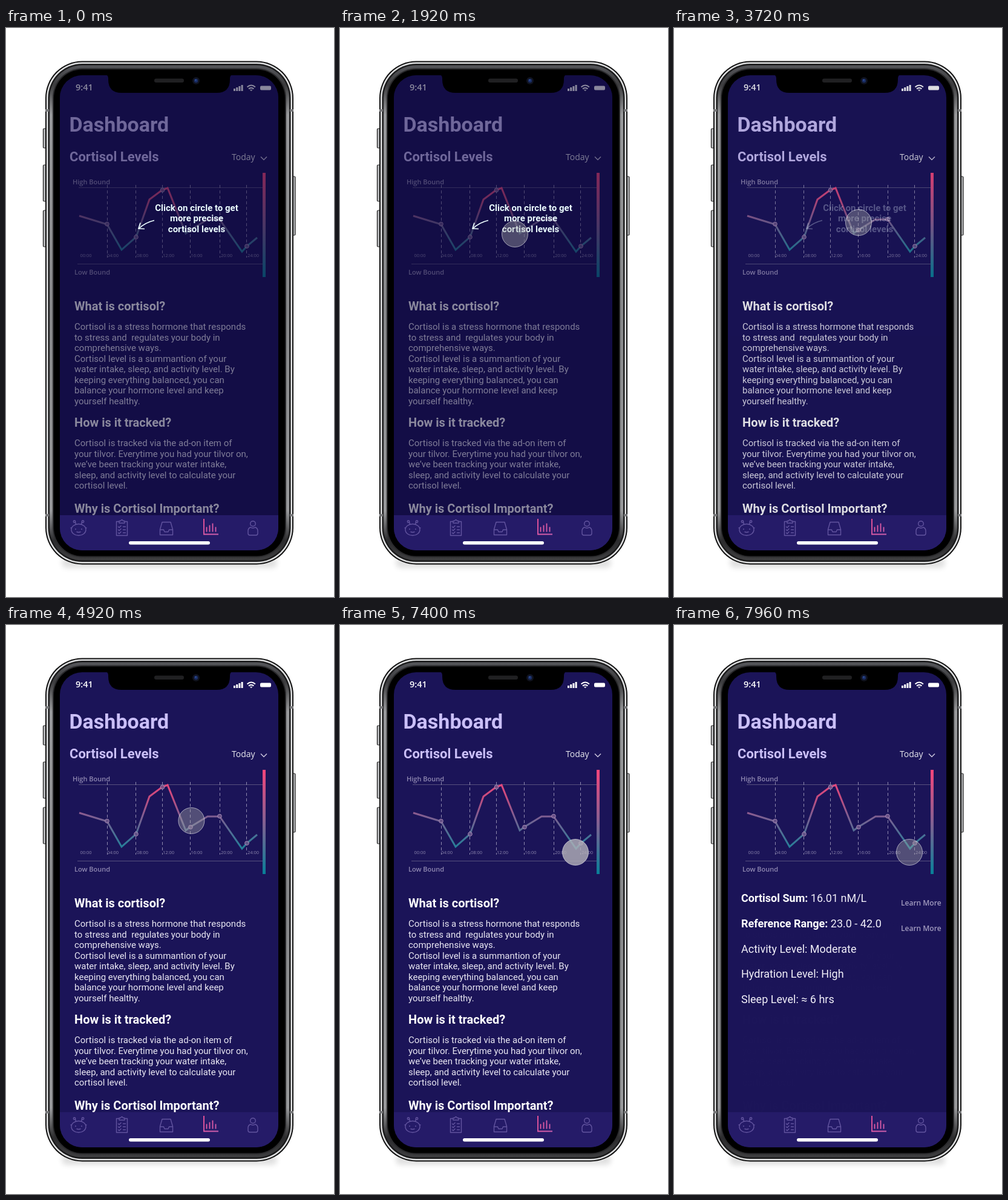
Animation of 542x939 px, one loop 8000 ms. Source, as an HTML page:

```html
<!DOCTYPE html>
<html lang="en">
<head>
<meta charset="utf-8">
<title>Cortisol dashboard</title>
<style>
html, body { margin: 0; width: 100%; height: 100%; overflow: hidden; background: #fff; }
svg { display: block; width: 542px; height: 939px; }
text { font-family: Roboto, sans-serif; fill: #fff; white-space: pre; }
.sans { font-family: "Open Sans", sans-serif; }
.title { font-weight: 700; fill: #cabff8; }
.heading { font-size: 20px; font-weight: 700; }
.body { font-size: 15px; fill: #e9e7f3; }
.row { font-size: 18px; fill: #f3f1fa; }
.row tspan { font-weight: 700; fill: #fff; }
.bound { font-size: 11px; font-weight: 600; fill: #9089b2; }
.more { font-size: 12px; font-weight: 600; fill: #a39dc0; }
.tick { font-size: 7.5px; fill: #8c86ad; }
.hint { font-size: 15px; font-weight: 700; fill: #ebfcff; text-anchor: middle; }
.icon { fill: none; stroke: #62549f; stroke-width: 1.4; stroke-linecap: round; stroke-linejoin: round; }
</style>
</head>
<body>
<svg viewBox="0 0 542 939">
  <defs>
    <linearGradient id="level" gradientUnits="userSpaceOnUse" x1="0" y1="262" x2="0" y2="368">
      <stop offset="0" stop-color="#e4477d"/>
      <stop offset=".22" stop-color="#c44c7e"/>
      <stop offset=".5" stop-color="#815e91"/>
      <stop offset="1" stop-color="#237f98"/>
    </linearGradient>
    <linearGradient id="scale" x2="0" y2="1">
      <stop offset="0" stop-color="#f3457b"/>
      <stop offset=".5" stop-color="#846091"/>
      <stop offset="1" stop-color="#087f98"/>
    </linearGradient>
    <linearGradient id="steel" x2="0" y2="1">
      <stop offset="0" stop-color="#55565a"/>
      <stop offset=".04" stop-color="#3c3c3e"/>
      <stop offset=".1" stop-color="#97989a"/>
      <stop offset=".5" stop-color="#858688"/>
      <stop offset=".9" stop-color="#97989a"/>
      <stop offset=".96" stop-color="#2c2c2e"/>
      <stop offset="1" stop-color="#3e3e40"/>
    </linearGradient>
    <linearGradient id="active" x2="1" y2="1">
      <stop offset="0" stop-color="#f7559b"/>
      <stop offset="1" stop-color="#c85fae"/>
    </linearGradient>
    <filter id="blur" x="-10%" y="-100%" width="120%" height="300%"><feGaussianBlur stdDeviation="4"/></filter>
    <clipPath id="screen"><rect x="89" y="78" width="361" height="784" rx="37"/></clipPath>
  </defs>

  <!-- phone body -->
  <rect x="92" y="874" width="356" height="17" rx="8" fill="#000" opacity=".12" filter="url(#blur)"/>
  <g fill="#b4b5b7" stroke="#222" stroke-width="1.2">
    <rect x="61.5" y="166" width="6" height="32" rx="1.5"/>
    <rect x="61.5" y="226" width="6" height="60" rx="1.5"/>
    <rect x="61.5" y="301" width="6" height="60" rx="1.5"/>
    <rect x="472" y="245" width="6" height="97" rx="1.5"/>
  </g>
  <g id="frame"></g>
  <path d="M65 136h6M469 136h6M65 804h6M469 804h6" stroke="#77787a" stroke-width="4"/>

  <g clip-path="url(#screen)">
    <rect x="89" y="78" width="361" height="784" fill="#1b1458"/>

    <!-- status bar -->
    <text class="sans" x="115" y="103" font-size="14.5" font-weight="600">9:41</text>
    <path d="M377.5 104v-4M381.7 104v-6M385.9 104v-8M390.1 104v-10" stroke="#fff" stroke-width="3"/>
    <g fill="none" stroke="#fff" stroke-width="2">
      <path d="M398.5 97.5q6.7-6 13.4 0M401 100.5q4.2-3.6 8.4 0"/>
      <path d="M403.5 102.2h3.4l-1.7 1.5z" stroke-width="1"/>
    </g>
    <rect x="420" y="95.5" width="18" height="7" rx="2" fill="#fff"/>

    <text class="title" x="104.5" y="171" font-size="34">Dashboard</text>
    <text class="title" x="105" y="220" font-size="22">Cortisol Levels</text>
    <text class="sans" x="373" y="218" font-size="14" fill-opacity=".9">Today</text>
    <path d="M421 212.5l5 5 5-5" fill="none" stroke="#c9c4dc" stroke-width="1.5"/>

    <!-- chart -->
    <path d="M120 263.5H424M118 389.5H424" stroke="#57517f"/>
    <g id="grid" stroke="#8f8aaf" stroke-dasharray="5 4"></g>
    <text class="sans bound" x="110" y="258">High Bound</text>
    <text class="sans bound" x="113" y="406.5">Low Bound</text>
    <g id="ticks"></g>
    <polyline points="121,310 167,324 191,366 215,345 237,283 258,267.5 267,264 297,339 305,333 333,316 353,316 390,369 398,360 415,346"
      fill="none" stroke="url(#level)" stroke-width="3"/>
    <g id="dots" fill="#6b5188" fill-opacity=".75" stroke="#a98fb8"></g>
    <rect x="424" y="239" width="5" height="172" fill="url(#scale)"/>

    <g id="about"></g>
    <g id="details" opacity="0"></g>

    <g id="guide">
      <rect x="89" y="78" width="361" height="726" fill="#0c0833" fill-opacity=".48"/>
      <text class="hint" x="315" y="301.5">Click on circle to get</text>
      <text class="hint" x="315" y="319">more precise</text>
      <text class="hint" x="315" y="336.5">cortisol levels</text>
      <path d="M245 317.5Q230 321 219.5 331M222 321.5l-3 9.5 10 .5" fill="none" stroke="#ebfcff" stroke-width="1.7"/>
    </g>

    <!-- tab bar -->
    <rect x="89" y="804" width="361" height="58" fill="#251b68"/>
    <g class="icon">
      <ellipse cx="120" cy="828" rx="12" ry="9.5"/>
      <path d="M115.5 819l-1-4M124.5 819l1-4M117 831.5q3 1.500 6 0M108 825h-1M132 825h1"/>
      <circle cx="113" cy="814.5" r="1.7"/><circle cx="127" cy="814.5" r="1.7"/>
      <path d="M115 827h0M125 827h0" stroke-width="2"/>
      <path d="M187 814.5h-4.500v23h18v-23H196M187 817v-3.500h2.500q2-4 4 0H196v3.500z"/>
      <path d="M185.5 823l1.500 1.500 3-3M193.500 823h4M185.500 828l1.500 1.500 3-3M193.500 828h4M185.500 833l1.500 1.500 3-3M193.500 833h4"/>
      <path d="M258 815.5h14l3.500 12v9h-21v-9zM254.500 828h6l1.500 3.500h6l1.500-3.500h6"/>
      <circle cx="408" cy="818" r="4.3"/>
      <path d="M404 824q-4 1.500-4 6v4q0 3 3 3h10q3 0 3-3v-4q0-4.500-4-6-4 2.500-8 0z"/>
    </g>
    <path d="M327 810v25.500h24M331.500 831.500v-8M336.500 831.500v-11M341.500 831.500v-14M346.500 831.500v-8" fill="none" stroke="url(#active)" stroke-width="1.8"/>
    <rect x="203" y="847" width="134" height="5.5" rx="2.75" fill="#fff"/>
  </g>

  <!-- notch -->
  <path d="M163 77q6 0 6 6v2q0 22 22 22h157q22 0 22-22v-2q0-6 6-6z"/>
  <rect x="245" y="83.5" width="49" height="6.5" rx="3.2" fill="#202022"/>
  <circle cx="314" cy="87" r="6" fill="#10131f"/>
  <circle cx="314" cy="87" r="3.2" fill="#1a2d63"/>
  <circle cx="313.5" cy="86" r="1.2" fill="#31539c"/>

  <circle id="touch" r="21.5" stroke="#fff" stroke-opacity=".55"/>
</svg>
<script>
const $ = id => document.getElementById(id);
const add = (id, markup) => $(id).insertAdjacentHTML('beforeend', markup);
const text = (id, cls, x, y, content) => add(id, `<text class="${cls}" x="${x}" y="${y}">${content}</text>`);

// Nested shells: inset from the outer edge, fill
for (const [inset, fill] of [[0, '#111'], [2, '#dfe0e1'], [4.5, '#1a1a1b'], [7, 'url(#steel)'], [12, '#2a2a2c'], [14, '#000']])
  add('frame', `<rect x="${65 + inset}" y="${54.5 + inset}" width="${410 - 2 * inset}" height="${831 - 2 * inset}" rx="${61 - inset}" fill="${fill}"/>`);

for (const x of [167.5, 214.5, 258.5, 304.5, 353.5, 397.5])
  add('grid', `<path d="M${x} 259V379"/>`);
[122.5, 167, 216, 259, 305.5, 355, 399].forEach((x, i) =>
  text('ticks', 'sans tick', x, 378, String(i * 4).padStart(2, '0') + ':00'));
for (const [x, y] of [[167, 323.5], [215, 345], [258.5, 267.5], [305, 333.5], [353, 315.5], [398, 360]])
  add('dots', `<circle cx="${x}" cy="${y}" r="3.3"/>`);

function section(y, heading, lines = []) {
  text('about', 'heading', 113, y, heading);
  lines.forEach((line, i) => text('about', 'body', 113, y + 32.3 + i * 17.58, line));
}
section(465.7, 'What is cortisol?', [
  'Cortisol is a stress hormone that responds',
  'to stress and  regulates your body in',
  'comprehensive ways.',
  'Cortisol level is a summantion of your',
  'water intake, sleep, and activity level. By',
  'keeping everything balanced, you can',
  'balance your hormone level and keep',
  'yourself healthy.']);
section(657.7, 'How is it tracked?', [
  'Cortisol is tracked via the ad-on item of',
  'your tilvor. Everytime you had your tilvor on,',
  'we’ve been tracking your water intake,',
  'sleep, and activity level to calculate your',
  'cortisol level.']);
section(800, 'Why is Cortisol Important?');

['<tspan>Cortisol Sum:</tspan> 16.01 nM/L', '<tspan>Reference Range:</tspan> 23.0 - 42.0',
  'Activity Level: Moderate', 'Hydration Level: High', 'Sleep Level: ≈ 6 hrs']
  .forEach((row, i) => text('details', 'row', 111, 457 + i * 41.8, row));
for (const y of [463, 505]) text('details', 'sans more', 375, y, 'Learn More');

const LOOP = 8000, STEP = 40;
// Pointer path: time, x, y
const path = [
  [760, 556, 87], [900, 470, 150], [1080, 360, 240], [1280, 272, 308], [1400, 258, 324], [1560, 268, 336],
  [1920, 289, 340], [2100, 305, 322], [2220, 302, 303], [2400, 307, 325], [2600, 298, 321],
  [3320, 298, 321], [3480, 305, 321], [4880, 305, 321], [5720, 334, 362], [6120, 389, 375], [LOOP, 389, 375]];

function pointerAt(t) {
  const i = Math.max(1, path.findIndex(p => p[0] >= t));
  const [t0, x0, y0] = path[i - 1], [t1, x1, y1] = path[i];
  const k = (t - t0) / (t1 - t0);
  return [x0 + (x1 - x0) * k, y0 + (y1 - y0) * k];
}

function dissolve(t, start) {
  const k = Math.min(1, Math.max(0, (t - start) / 340));
  return 1 - (1 - k) ** 2;
}

function draw(now) {
  const t = Math.floor(now % LOOP / STEP) * STEP;
  const pressed = t >= 3440 && t < 3600 || t >= 7400 && t < 7680;
  const [x, y] = pointerAt(t);
  const touch = $('touch');
  touch.setAttribute('transform', `translate(${x} ${y})`);
  touch.setAttribute('visibility', t < 760 ? 'hidden' : 'visible');
  touch.setAttribute('fill', pressed ? 'rgba(180,178,186,.8)' : 'rgba(165,165,165,.4)');
  const swap = dissolve(t, 7640);
  $('guide').setAttribute('opacity', 1 - dissolve(t, 3560));
  $('about').setAttribute('opacity', 1 - swap);
  $('details').setAttribute('opacity', swap);
}

const start = performance.now();
function frame() {
  draw(performance.now() - start);
  requestAnimationFrame(frame);
}
frame();
</script>
</body>
</html>
```
